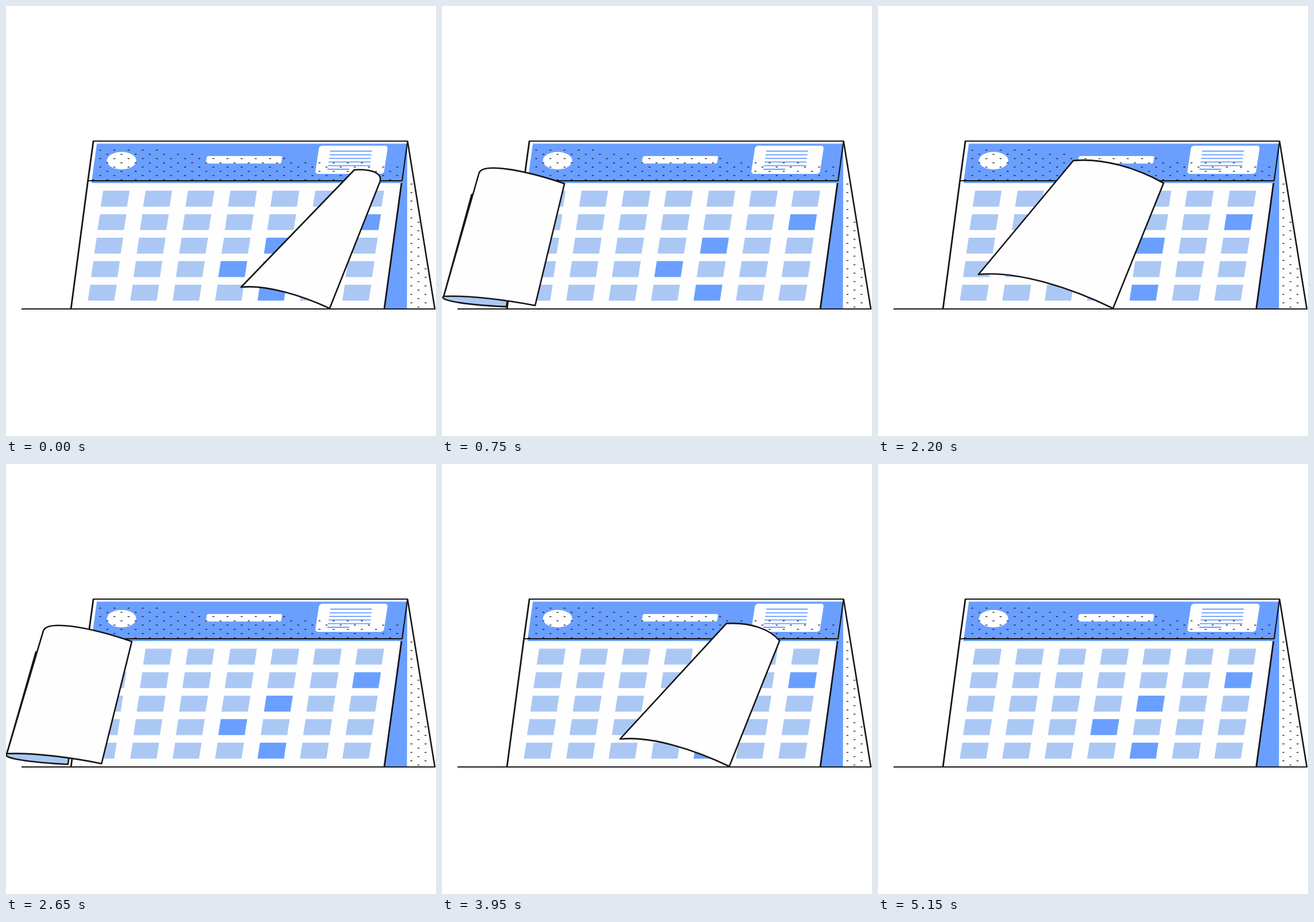
An HTML page with a canvas for the animation above (5750 ms loop, 748 by 748 pixels).

```html
<!DOCTYPE html>
<html lang="en">
<head>
<meta charset="utf-8">
<title>Calendar</title>
<style>
html, body { margin: 0; height: 100%; overflow: hidden; background: #fff; }
canvas { display: block; width: 100vw; height: 100vh; }
</style>
</head>
<body>
<canvas id="stage" width="748" height="748"></canvas>
<script>
const ctx = document.getElementById('stage').getContext('2d');
const INK = '#161616', BLUE = '#6a9fff', PALE = '#abc8f4', WHITE = '#fefefe';
const LOOP = 5750, TURN = LOOP / 3, STEP = 50;
const MARKED = [13, 18, 24, 32];

const leftEdge = y => 142.5 - (y - 304) * 0.132;
const onEdge = y => [leftEdge(y), y];

// Key poses: top-left, two bow controls, top-right, bottom-right, bottom-left.
// The last one is the sheet tucked away at the calendar's left edge.
const poses = [
  { at: 0, p: [606,285, 639,283, 656,292, 650,307, 563,526, 409,489] },
  { at: 283, p: [340,269, 392,264, 450,282, 497,308, 409,526, 175,467] },
  { at: 517, p: [148,274, 185,253, 285,275, 365,309, 277,526, 33,476] },
  { at: 750, p: [64,292, 68,272, 140,284, 213,309, 162,521, 3,505] },
  { at: 1275, p: [318, 318, 318, 318, 517, 517].flatMap(onEdge) }
];

function slope(i, k) {
  const a = poses[Math.max(i - 1, 0)], b = poses[Math.min(i + 1, poses.length - 1)];
  return (b.p[k] - a.p[k]) / (b.at - a.at);
}

// Smooth Hermite path through the key poses; null once the sheet is gone.
function sheetAt(t) {
  const n = poses.findIndex(pose => pose.at > t);
  if (n < 0) return null;
  const a = poses[n - 1], b = poses[n], span = b.at - a.at, s = (t - a.at) / span;
  const mix = s * s * (3 - 2 * s);
  const v = a.p.map((from, k) => from + (b.p[k] - from) * mix +
    span * (s * (1 - s) ** 2 * slope(n - 1, k) - s * s * (1 - s) * slope(n, k)));
  const [topLeft, bow1, bow2, topRight, bottomRight, bottomLeft] =
    [0, 2, 4, 6, 8, 10].map(k => ({ x: v[k], y: v[k + 1] }));
  return { topLeft, bow1, bow2, topRight, bottomRight, bottomLeft };
}

function path(points) {
  ctx.beginPath();
  for (let i = 0; i < points.length; i += 2) ctx.lineTo(points[i], points[i + 1]);
}

function fill(color) {
  ctx.fillStyle = color;
  ctx.fill();
}

function stroke(width, color = INK) {
  ctx.lineWidth = width;
  ctx.strokeStyle = color;
  ctx.stroke();
}

function poly(points, color) {
  path(points);
  fill(color);
}

function line(points, width, color) {
  path(points);
  stroke(width, color);
}

// Slanted rounded box: x is the left end of the top side.
function slantBox(x, y, w, h, slant, radius, color) {
  ctx.save();
  ctx.transform(1, 0, -slant / h, 1, x, y);
  ctx.beginPath();
  ctx.roundRect(0, 0, w, h, radius);
  ctx.restore();
  fill(color);
}

// One staggered lattice of dots, cut to the span given for each row.
function drawDots(firstRow, lastRow, span) {
  ctx.fillStyle = INK;
  for (let row = firstRow; row <= lastRow; row++) {
    const y = 250.7 + row * 7.38, [from, to] = span(y, row);
    for (let x = row % 2 ? 151.7 : 164; x < to; x += 24.6)
      if (x > from) ctx.fillRect(x - 1.7, y - 0.65, 3.4, 1.3);
  }
}

function drawHeader() {
  poly([158,239.5, 698,239.5, 688,308, 148.5,308], BLUE);
  ctx.beginPath();
  ctx.ellipse(201, 269, 25.5, 15.2, 0, 0, 2 * Math.PI);
  fill(WHITE);
  slantBox(349.5, 261, 131, 13, 2, 2.5, WHITE);
  slantBox(545, 243, 119.5, 49, 7.5, 5, WHITE);
  for (let i = 0; i < 6; i++) {
    const y = 252.5 + i * 6.3;
    line([564 - i, y, i === 5 ? 597 : 636.5 - i * 0.7, y], 1.8, BLUE);
  }
  drawDots(0, 7, (y, row) => [leftEdge(y) + 8, Math.min(684, Math.max(264, 212.5 + row * 136))]);
}

function drawSide() {
  poly([699,235, 746,527, 697,527], WHITE);
  poly([698,237, 697.5,527, 658,527, 688,308], BLUE);
  drawDots(8, 37, y => [699, 695 + (y - 235) * 0.161]);
}

function drawCells() {
  for (let i = 0; i < 35; i++) {
    const col = i % 7, row = (i - col) / 7;
    slantBox(169 + col * 73.8 - row * 5.6, 321.3 + row * 40.85, 46, 27.7, 4.3, 0,
      MARKED.includes(i) ? BLUE : PALE);
  }
}

function drawCalendar() {
  poly([152,235, 699,235, 688,308, 658,527, 113,527, 142,304], WHITE);
  drawSide();
  drawHeader();
  drawCells();
  line([27,527, 747,527], 2);
  line([151,235, 699,235], 2);
  line([152,235, 142.5,304, 113,527], 2.8);
  line([142,304, 689,304, 698.5,235], 2.2);
  line([688,308, 658,527], 2.8);
  line([698.5,235, 746,527], 2.6);
}

// The part folded underneath grows as the visible part narrows.
function drawFlap({ topLeft, topRight, bottomRight, bottomLeft: b }) {
  const width = 65 + 0.52 * (244 - (bottomRight.x - b.x));
  const drop = 13 + 0.32 * (bottomRight.y - b.y);
  ctx.beginPath();
  ctx.moveTo(topLeft.x + (b.x - topLeft.x) * 0.17 - 2, topLeft.y + (b.y - topLeft.y) * 0.17);
  ctx.lineTo(b.x, b.y);
  ctx.bezierCurveTo(b.x - 11, b.y + drop * 0.45, b.x + width * 0.45, b.y + drop * 0.85,
    b.x + width, b.y + drop);
  ctx.lineTo((topLeft.x + topRight.x) / 2, (topLeft.y + topRight.y) / 2);
  ctx.closePath();
  fill(PALE);
  stroke(2.6);
}

function drawSheet({ topLeft, bow1, bow2, topRight, bottomRight: r, bottomLeft: l }) {
  const dx = l.x - r.x, dy = l.y - r.y;
  ctx.beginPath();
  ctx.moveTo(topLeft.x, topLeft.y);
  ctx.bezierCurveTo(bow1.x, bow1.y, bow2.x, bow2.y, topRight.x, topRight.y);
  ctx.lineTo(r.x, r.y);
  ctx.bezierCurveTo(r.x + dx * 0.31, r.y + dy * 0.6, r.x + dx * 0.71, r.y + dy * 1.12, l.x, l.y);
  ctx.closePath();
  fill(WHITE);
  stroke(2.6);
}

function render(now) {
  const time = Math.floor(now % LOOP / STEP) * STEP;
  const sheet = sheetAt(time % TURN);
  ctx.lineJoin = 'round';
  ctx.fillStyle = '#fff';
  ctx.fillRect(0, 0, 748, 748);
  if (sheet) drawFlap(sheet);
  drawCalendar();
  if (sheet) drawSheet(sheet);
}

const start = performance.now();
function tick() {
  render(performance.now() - start);
  requestAnimationFrame(tick);
}
tick();
</script>
</body>
</html>
```
